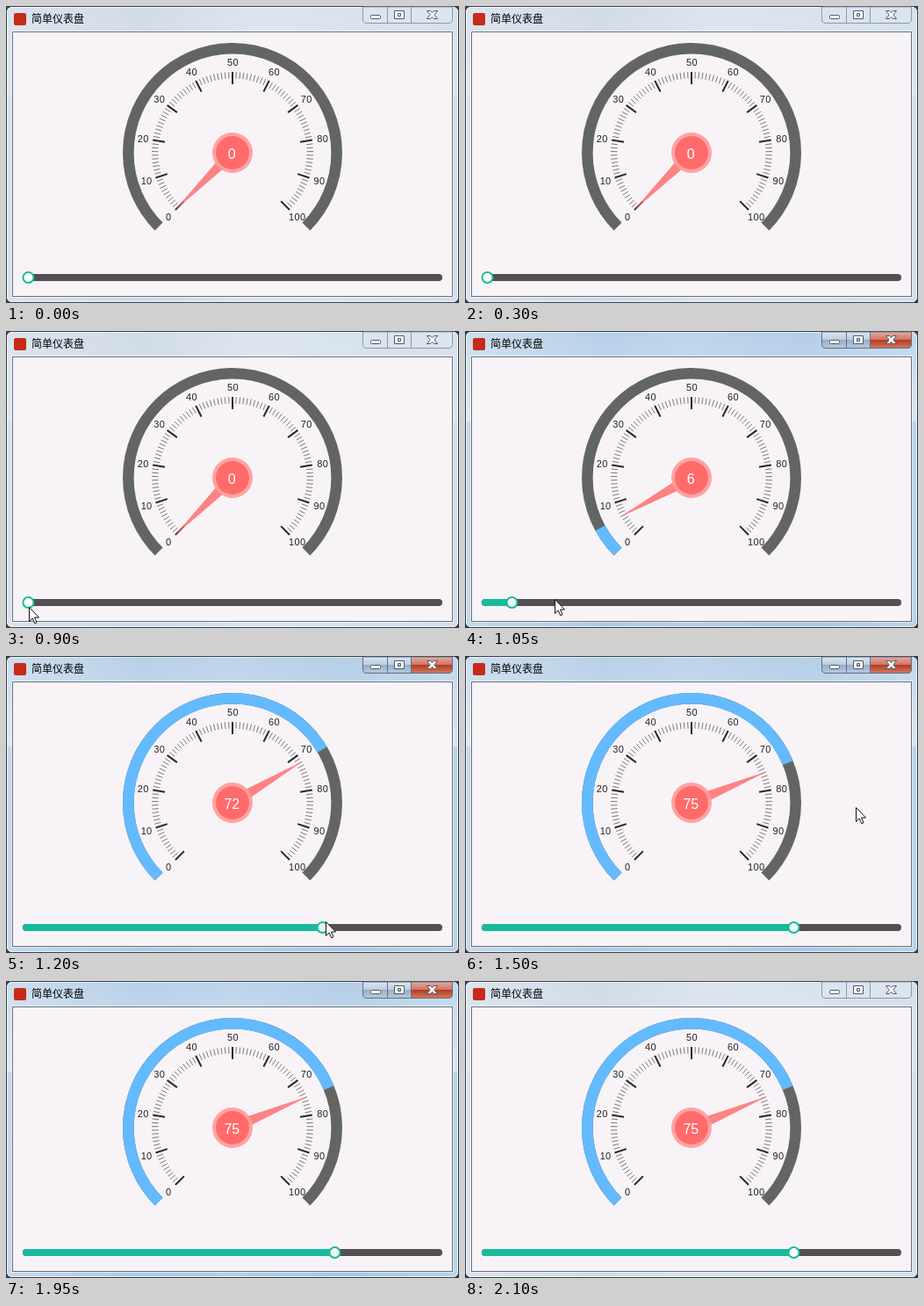
Write an HTML page that moves like this. It is 516 px wide and 338 px high and loops after 2250 ms.

```html
<!DOCTYPE html>
<html lang="zh">
<head>
<meta charset="utf-8">
<title>简单仪表盘</title>
<style>
html, body { margin: 0; width: 100%; height: 100%; overflow: hidden; background: #343a40; }
svg { display: block; width: 516px; height: 338px; }
text { font-family: "Liberation Sans", Arial, sans-serif; }
.title { font: 12px "Noto Sans CJK SC", "Noto Sans CJK", sans-serif; }
.labels { font-size: 11px; letter-spacing: .3px; text-anchor: middle; fill: #222; }
</style>
</head>
<body>
<svg viewBox="0 0 516 338">
  <defs>
    <linearGradient id="idleGlass" x2="1" y2="0">
      <stop offset="0" stop-color="#d9e2ed"/><stop offset=".3" stop-color="#cfdae8"/>
      <stop offset=".55" stop-color="#dae4ef"/><stop offset="1" stop-color="#d2dfec"/>
    </linearGradient>
    <linearGradient id="liveGlass" x2="1" y2="0">
      <stop offset="0" stop-color="#c6d9eb"/><stop offset=".3" stop-color="#adcae5"/>
      <stop offset=".5" stop-color="#b4cfe8"/><stop offset=".75" stop-color="#a9c8e4"/><stop offset="1" stop-color="#bad3e9"/>
    </linearGradient>
    <linearGradient id="sheen" x2="0" y2="1">
      <stop offset="0" stop-color="#fff" stop-opacity=".15"/><stop offset="1" stop-color="#fff" stop-opacity=".6"/>
    </linearGradient>
    <linearGradient id="blueBtn" x2="0" y2="1">
      <stop offset="0" stop-color="#dbe6f1"/><stop offset=".48" stop-color="#bdcddf"/>
      <stop offset=".5" stop-color="#98adc5"/><stop offset="1" stop-color="#b5cbe1"/>
    </linearGradient>
    <linearGradient id="redBtn" x2="0" y2="1">
      <stop offset="0" stop-color="#e5ac9f"/><stop offset=".48" stop-color="#cf7564"/>
      <stop offset=".5" stop-color="#b53a24"/><stop offset="1" stop-color="#d5795c"/>
    </linearGradient>
  </defs>

  <rect id="glass" x=".5" y=".5" width="515" height="337" rx="6" stroke="#353d46"/>
  <path id="shine" d="M2 7Q2 2 7 2H509Q514 2 514 7V103H2Z" fill="url(#sheen)"/>
  <rect x="1.5" y="1.5" width="513" height="335" rx="5" fill="none" stroke="#fff" stroke-opacity=".65"/>
  <rect x="6.5" y="28.5" width="503" height="303" fill="none" stroke="#fff" stroke-opacity=".5"/>
  <rect x="7.5" y="29.5" width="501" height="301" fill="#f7f3f7" stroke="#66717d"/>

  <rect x="9" y="8" width="14" height="14" rx="2" fill="#c82a18"/>
  <text class="title" x="29" y="19">简单仪表盘</text>

  <g id="buttons">
    <path id="smallBtn" d="M406.5 1V15Q406.5 19.5 411 19.5H461.5V1Z"/>
    <path id="closeBtn" d="M461.5 1V19.5H504Q508.5 19.5 508.5 15V1Z"/>
    <path d="M434.5 1V19" fill="none"/>
  </g>
  <g fill="#fff" stroke="#505a68">
    <rect x="415.5" y="10.5" width="11" height="4" rx="1"/>
    <path fill-rule="evenodd" d="M442.5 5.5H453.5V14.5H442.5ZM446.5 8.5V11.5H449.5V8.5Z"/>
    <path d="M479.5 5.5H483.5L485.5 7.7 487.5 5.5H491.5L487.8 10 491.5 14.5H487.5L485.5 12.3 483.5 14.5H479.5L483.2 10Z"/>
  </g>

  <g fill="none" stroke-width="12.6">
    <path id="ring" stroke="#636563"/>
    <path id="arc" stroke="#63baff"/>
  </g>
  <g id="ticks"></g>
  <g id="labels" class="labels"></g>
  <path id="needle" d="M251 167H265L258 73.5Z" fill="#ff6b6b" fill-opacity=".82"/>
  <circle cx="258" cy="167" r="23" fill="#ff9c9c" fill-opacity=".92"/>
  <circle cx="258" cy="167" r="19" fill="#ff6b6b"/>
  <text id="value" x="257.3" y="173.5" font-size="16" fill="#fff" text-anchor="middle"></text>

  <rect x="19" y="305" width="478" height="8" rx="4" fill="#525052"/>
  <rect id="fill" x="19" y="305" height="8" rx="4" fill="#18ba9c"/>
  <circle id="knob" cy="309" r="6" stroke="#18ba9c" stroke-width="2"/>

  <path id="cursor" d="M.5 .5V16.5L4.2 13 6.8 18.7 9 17.7 6.5 12H11.5Z" fill="#fff" stroke="#111"/>
</svg>
<script>
const STEP = 150, LOOP = 2250;
const CX = 258, CY = 167, RING = 118.7;
const $ = id => document.getElementById(id);
const set = (el, attrs) => { for (const k in attrs) el.setAttribute(k, attrs[k]); };

function add(parent, tag, attrs, text = '') {
  const el = document.createElementNS('http://www.w3.org/2000/svg', tag);
  set(el, attrs);
  el.textContent = text;
  parent.append(el);
}

const angle = v => -135 + v * 2.7;

function polar(v, r) {
  const a = angle(v) * Math.PI / 180;
  return [CX + r * Math.sin(a), CY - r * Math.cos(a)];
}

const arcPath = v =>
  `M${polar(0, RING)}A${RING} ${RING} 0 ${v * 2.7 > 180 ? 1 : 0} 1 ${polar(v, RING)}`;

function buildDial() {
  set($('ring'), { d: arcPath(100) });
  for (let v = 0; v <= 100; v++) {
    const major = v % 10 === 0;
    add($('ticks'), 'path', {
      d: `M${polar(v, 92)}L${polar(v, major ? 78 : 84.5)}`,
      stroke: major ? '#292829' : '#7b797b',
      'stroke-width': major ? 2 : 1
    });
    if (major) {
      const [x, y] = polar(v, 103.5);
      add($('labels'), 'text', { x: x + .5, y: y + 4 }, v);
    }
  }
}

// Pointer position at each step; absent while outside the window
const pointer = {
  4: [26, 314], 5: [26, 314], 6: [26, 314], 7: [102, 305],
  8: [364, 302], 9: [379, 304], 10: [445, 172], 11: [488, 92]
};
const valueAt = step => step < 7 ? 0 : step < 8 ? 6 : step < 9 ? 72 : 75;

function render(time) {
  const step = Math.floor(time % LOOP / STEP);
  const live = step >= 7 && step < 14;
  const v = valueAt(step);
  const knobX = 25.5 + v * 4.653;
  const at = pointer[step];

  set($('glass'), { fill: live ? 'url(#liveGlass)' : 'url(#idleGlass)' });
  set($('shine'), { opacity: live ? .75 : .3 });
  set($('buttons'), { stroke: live ? '#5e7186' : '#8c99a8' });
  set($('smallBtn'), { fill: live ? 'url(#blueBtn)' : '#dce5ef' });
  set($('closeBtn'), { fill: live ? 'url(#redBtn)' : '#dce5ef' });

  set($('arc'), { d: v ? arcPath(v) : '' });
  set($('needle'), { transform: `rotate(${angle(v)} ${CX} ${CY})` });
  $('value').textContent = v;
  set($('fill'), { width: knobX - 19 });
  set($('knob'), { cx: knobX, fill: live ? '#eff7f2' : '#fff' });

  set($('cursor'), {
    visibility: at ? 'visible' : 'hidden',
    transform: `translate(${at || [0, 0]})`
  });
}

buildDial();
const start = performance.now();
function tick() {
  render(performance.now() - start);
  requestAnimationFrame(tick);
}
tick();
</script>
</body>
</html>
```
